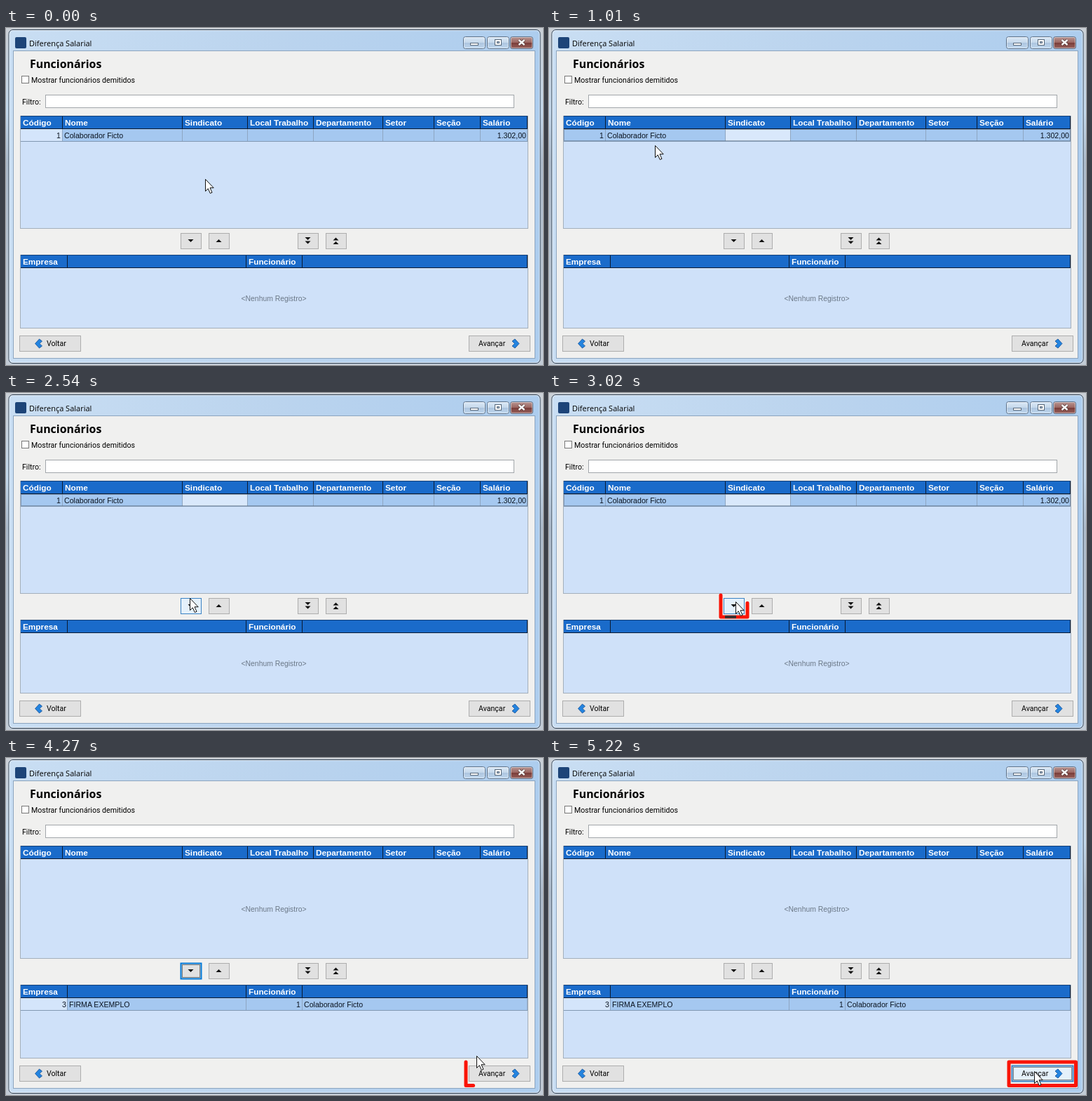
Animation, 766 px wide and 480 px high, one loop 5.28 s. Source, as an HTML page:

```html
<!DOCTYPE html>
<html lang="pt-BR">
<head>
<meta charset="utf-8">
<title>Diferença Salarial</title>
<style>
html, body { margin: 0; width: 100%; height: 100%; overflow: hidden; }
svg { display: block; width: 766px; height: 480px; }
text { white-space: pre; }
.title { font: 11px "Open Sans", sans-serif; }
.heading { font: bold 15.9px "Open Sans", sans-serif; }
.label { font: 10.6px Roboto, sans-serif; }
.head { font: bold 11.8px "Liberation Sans", sans-serif; fill: #fff; }
.cell { font: 10.6px "Liberation Sans", sans-serif; fill: #0b1420; }
.empty { font: 10.4px "Liberation Sans", sans-serif; fill: #6b7887; }
.face { fill: #e1e1e1; stroke: #adadad; }
.dots { display: none; fill: none; stroke: #111; stroke-dasharray: 1 1; }
.focus .face { stroke: #0078d7; stroke-width: 2; }
.hover .face { fill: #e5f1fb; stroke: #3b83c4; }
.focus .dots { display: inline; }
.mark { fill: none; stroke: #fa1406; stroke-width: 5; stroke-linecap: round; stroke-linejoin: round; stroke-dasharray: 1 2; }
</style>
</head>
<body>
<svg id="stage" viewBox="0 0 766 480"></svg>
<script>
const LOOP = 5280, STEP = 68.6;
const stage = document.getElementById('stage');

const rect = (x, y, w, h, fill, more = '') =>
  `<rect x="${x}" y="${y}" width="${w}" height="${h}" fill="${fill}" ${more}/>`;
const text = (x, y, cls, s, anchor = 'start') =>
  `<text x="${x}" y="${y}" class="${cls}" text-anchor="${anchor}">${s}</text>`;
const path = (d, fill, more = '') => `<path d="${d}" fill="${fill}" ${more}/>`;
const group = (id, body) => `<g id="${id}">${body}</g>`;

function button(id, x, y, w, body) {
  return group(id,
    `<rect class="face" x="${x + .5}" y="${y + .5}" width="${w - 1}" height="22"/>` +
    `<rect class="dots" x="${x + 2.5}" y="${y + 2.5}" width="${w - 5}" height="18"/>` + body);
}

// Triangle pointing down (dir 1) or up (dir -1)
const triangle = (x, y, dir) => path(`M${x - 4} ${y - 2 * dir}h8l-4 ${4 * dir}z`, '#111');
const chevron = (x, dir) =>
  path(`M${x} 449.5l${6 * dir} -6.5l${4 * dir} 3l${-3.5 * dir} 3.5l${3.5 * dir} 3.5l${-4 * dir} 3z`,
    '#2384e0', 'stroke="#174f94" stroke-width=".8"');

function grid(y, height, edges, names) {
  let out = rect(20.5, y + .5, 724, height, '#cfe1f9', 'stroke="#a4afbb"') +
    rect(21, y + 1, 723, 18, '#1a6bca') + rect(21, y, 723, 1, '#123f78') + rect(21, y + 18, 723, 1, '#0b1a30');
  names.forEach((name, i) => {
    out += text(edges[i] + 3, y + 14, 'head', name) + rect(edges[i + 1] - 1, y + 1, 1, 18, '#0b1a30');
  });
  return out;
}

function row(y, edges) {
  let out = rect(21, y, 723, 17, '#a5c8f0') + rect(21, y + 17, 723, 1, '#8298b2');
  edges.slice(1).forEach(x => out += rect(x - 1, y, 1, 17, '#8ea6c2'));
  return out;
}

const upperEdges = [21, 81, 252, 345, 439, 538, 611, 677, 744];
const lowerEdges = [21, 88, 343, 423, 744];
const none = '&lt;Nenhum Registro&gt;';
const person = 'Colaborador Ficto';

const caption = (x, w, fill) =>
  rect(x + .5, 12.5, w, 17, fill, 'rx="3" stroke="#5c7189"') +
  rect(x + 1.5, 13.5, w - 2, 15, 'none', 'rx="2" stroke="#fff" stroke-opacity=".45"');

stage.innerHTML = `
<defs>
  <linearGradient id="frame" x2="1" y2="0"><stop stop-color="#c9def3"/><stop offset=".5" stop-color="#bbd4ee"/><stop offset="1" stop-color="#adcdee"/></linearGradient>
  <linearGradient id="pane" x2="0" y2="1"><stop stop-color="#dce9f6"/><stop offset=".48" stop-color="#c5d8eb"/><stop offset=".52" stop-color="#adc5df"/><stop offset="1" stop-color="#c1d9ef"/></linearGradient>
  <linearGradient id="close" x2="0" y2="1"><stop stop-color="#b99591"/><stop offset=".48" stop-color="#9c6762"/><stop offset=".52" stop-color="#7a3d39"/><stop offset="1" stop-color="#9a6560"/></linearGradient>
  <linearGradient id="back" x2="0" y2="1"><stop stop-color="#cbd0d6"/><stop offset=".25" stop-color="#c5d9ec"/><stop offset=".4" stop-color="#aebccc"/><stop offset="1" stop-color="#c3ccd6"/></linearGradient>
</defs>` +
  rect(0, 0, 766, 480, 'url(#back)') +
  rect(4, 2.5, 758, 475, 'url(#frame)', 'rx="6" stroke="#27384b"') +
  rect(5, 3.5, 756, 473, 'none', 'rx="5" stroke="#fff" stroke-opacity=".6"') +
  rect(10.5, 32.5, 744, 438, '#f0f0ef', 'stroke="#8ca5bf"') +
  rect(13, 13, 16, 16, '#1d4478', 'rx="2"') +
  text(33, 26, 'title', 'Diferença Salarial') +
  caption(652, 31, 'url(#pane)') + caption(686, 31, 'url(#pane)') + caption(719, 32, 'url(#close)') +
  rect(662.5, 21.5, 11, 3, '#fff', 'stroke="#58687a"') +
  rect(697.5, 16.5, 9, 8, '#fff', 'stroke="#58687a"') + rect(700.5, 19.5, 3, 2, '#b4c9df', 'stroke="#58687a"') +
  path('M731.5 17l8 7m0 -7l-8 7', 'none', 'stroke="#4e3534" stroke-width="4"') +
  path('M731.5 17l8 7m0 -7l-8 7', 'none', 'stroke="#fff" stroke-width="2.4"') +
  text(34, 57, 'heading', 'Funcionários') +
  rect(22.5, 68.5, 10, 10, '#fff', 'stroke="#777"') +
  text(36, 78, 'label', 'Mostrar funcionários demitidos') +
  text(23, 109, 'label', 'Filtro:') +
  rect(56.5, 95.5, 668, 18, '#fff', 'stroke="#a2a6aa"') +
  grid(125, 160, upperEdges, ['Código', 'Nome', 'Sindicato', 'Local Trabalho', 'Departamento', 'Setor', 'Seção', 'Salário']) +
  grid(323, 104, lowerEdges, ['Empresa', '', 'Funcionário', '']) +
  group('before',
    row(144, upperEdges) +
    group('codeCell', rect(21, 144, 59, 17, '#d4e5fb')) +
    group('unionCell', rect(252, 144, 92, 17, '#d9e8fb') +
      rect(21.5, 144.5, 722, 16, 'none', 'stroke="#56677b" stroke-dasharray="1 1"')) +
    text(78, 157, 'cell', '1', 'end') + text(83, 157, 'cell', person) + text(742, 157, 'cell', '1.302,00', 'end') +
    text(382, 389, 'empty', none, 'middle')) +
  group('after',
    text(382, 219, 'empty', none, 'middle') +
    row(342, lowerEdges) + rect(21, 342, 66, 17, '#d4e5fb') +
    text(86, 355, 'cell', '3', 'end') + text(90, 355, 'cell', 'FIRMA EXEMPLO') +
    text(420, 355, 'cell', '1', 'end') + text(425, 355, 'cell', person)) +
  button('down', 249, 292, 30, triangle(263.5, 303, 1)) +
  button('up', 289, 292, 30, triangle(303.5, 303, -1)) +
  button('allDown', 416, 292, 30, triangle(430.5, 300, 1) + triangle(430.5, 305.5, 1)) +
  button('allUp', 456, 292, 30, triangle(470.5, 300.5, -1) + triangle(470.5, 306, -1)) +
  button('back', 19, 438, 88, chevron(41.5, 1) + text(58, 453, 'label', 'Voltar')) +
  button('next', 660, 438, 88, text(674, 453, 'label', 'Avançar') + chevron(732, -1)) +
  '<path id="markDown" class="mark" pathLength="1" d="M245 288V319H283V288H245"/>' +
  group('smudge', rect(251, 317, 16, 4, '#3a3030')) +
  '<path id="markNext" class="mark" pathLength="1" d="M656 433V466.5H751.5V433H656"/>' +
  group('cursor', path('M.5 .5V17.5L4.3 13.8L7.3 20.5L10 19.3L7 12.7H12.2Z', '#fff', 'stroke="#111"'));

const el = id => document.getElementById(id);
const show = (id, on) => { el(id).style.display = on ? 'inline' : 'none'; };

// Pointer stops: time, x, y
const stops = [
  [0, 284, 215], [400, 286, 151], [540, 286, 151], [1010, 151, 167], [2085, 151, 167],
  [2600, 266, 297], [3170, 266, 297], [3370, 271, 301], [3720, 271, 301],
  [4270, 671, 424], [4480, 692, 446], [LOOP, 692, 446]
];
const starts = [0, 60, 600, 2130, 2680, 3230, 3790, 4340, 4890];

function snap(t) {
  const start = starts.filter(s => s <= t).pop();
  return start ? start + Math.floor((t - start + 15) / STEP) * STEP : 0;
}

function pointer(t) {
  const i = Math.max(1, stops.findIndex(s => s[0] >= t));
  const [t0, x0, y0] = stops[i - 1], [t1, x1, y1] = stops[i];
  const p = (t - t0) / (t1 - t0), e = p * p * (3 - 2 * p);
  return [x0 + (x1 - x0) * e, y0 + (y1 - y0) * e].map(Math.round);
}

function drawMark(id, t, from, until) {
  const p = Math.min(1, (t - from) / 440);
  show(id, p > 0 && t < until);
  el(id).style.strokeDashoffset = 1 - p;
}

function render(time) {
  const t = Math.min(snap(time), LOOP - 1);
  const [x, y] = pointer(t);
  const over = (left, top, w) => x >= left && x < left + w && y >= top && y < top + 23;
  const moved = t >= 3290, confirmed = t >= 4950, picked = t >= 400;

  show('before', !moved);
  show('after', moved);
  show('codeCell', !picked);
  show('unionCell', picked);
  el('down').classList.toggle('hover', over(249, 292, 30));
  el('down').classList.toggle('focus', moved && !confirmed);
  el('next').classList.toggle('hover', over(660, 438, 88));
  el('next').classList.toggle('focus', confirmed);
  drawMark('markDown', t, 2740, 3290);
  drawMark('markNext', t, 4195, LOOP);
  show('smudge', t > 2930 && !moved);
  el('cursor').setAttribute('transform', `translate(${x} ${y})`);
}

const begin = performance.now();
function tick() {
  render((performance.now() - begin) % LOOP);
  requestAnimationFrame(tick);
}
tick();
</script>
</body>
</html>
```
